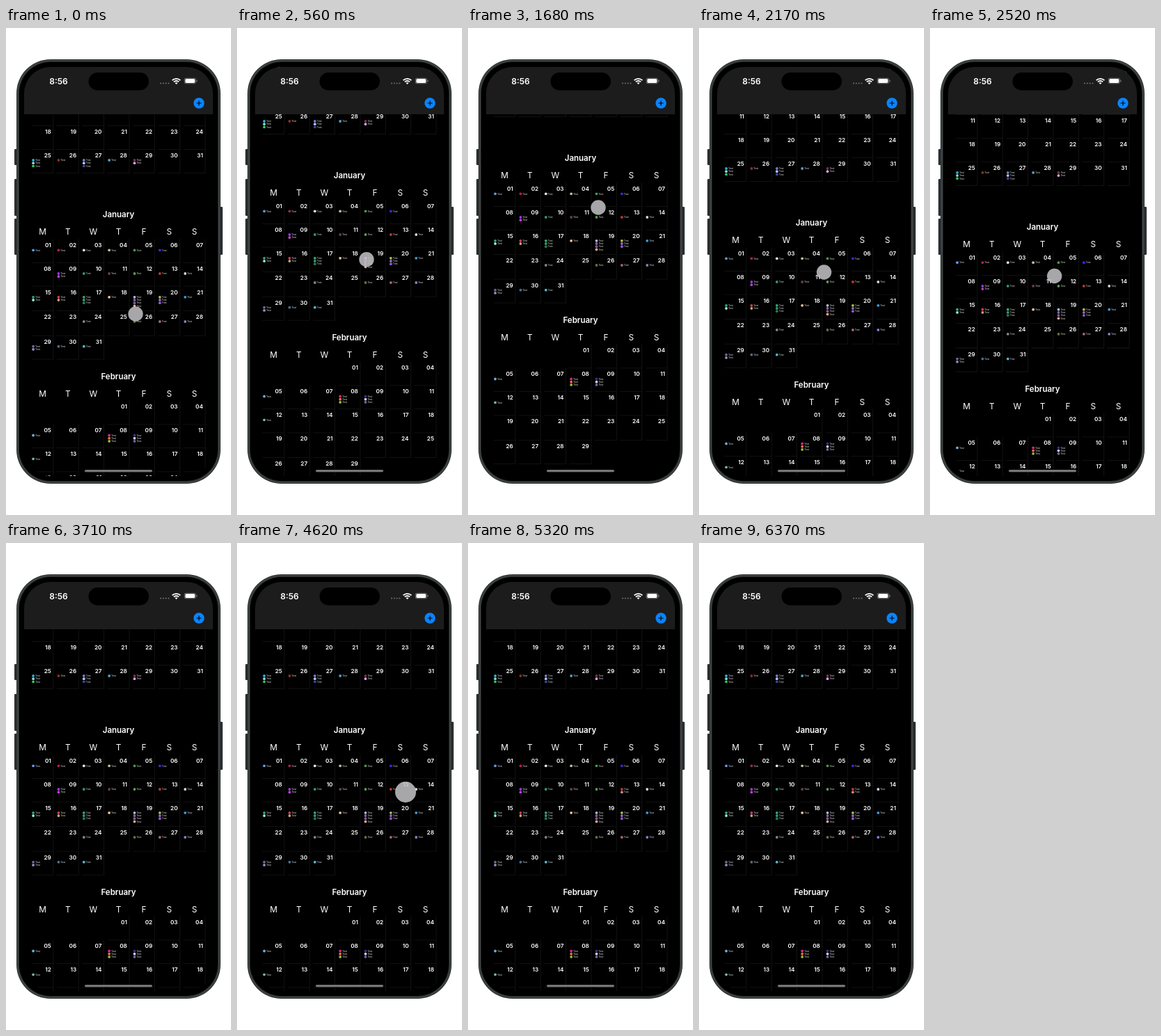
An HTML page with a canvas for the animation above (6970 ms loop, 323x700 px).

```html
<!DOCTYPE html>
<html lang="en">
<head>
<meta charset="utf-8">
<title>Calendar</title>
<style>
  html, body { margin: 0; width: 100%; height: 100%; overflow: hidden; background: #fff; }
  canvas { display: block; width: 323px; height: 700px; }
</style>
</head>
<body>
<canvas id="stage"></canvas>
<script>
const WIDTH = 323, HEIGHT = 700, LOOP = 6970, STEP = 70, LAST = 6370;
const canvas = document.getElementById('stage');
const ctx = canvas.getContext('2d');
const ratio = window.devicePixelRatio || 1;
canvas.width = WIDTH * ratio;
canvas.height = HEIGHT * ratio;

const PITCH = 36.35;
const EVENT_ADDED = 5110;

// y: title offset; rows: offset of each week's numbers from the title
const months = [
  { y: -233, first: 4, days: 31, rows: [10, 46, 80, 114, 148], events: {
    25: '#27b5cc #93d4dc #35c85a', 26: '#8e3023', 27: '#7877d0 #a0d4df #5538a0',
    28: '#559fc9', 29: '#7b304c #d4a5dc' } },
  { name: 'January', y: 0, first: 0, days: 31, rows: [44.3, 78, 111.8, 147, 182.7], events: {
    1: '#5e9ce8', 2: '#b32340', 3: '#e8e8e8', 4: '#b9c4a2', 5: '#489850', 6: '#392be0',
    9: '#963bd8 #c73bd2', 10: '#2f9b6b', 11: '#684150', 12: '#58a052', 13: '#bd3b2c',
    14: '#d7d8ef', 15: '#30ad7b #9ce6d2', 16: '#d73c61 #c2a36c', 17: '#3ba96c #2d9a74 #307a52',
    18: '#efc89a', 19: '#b8b9d8 #786a9c #895ba2 #e5a78f', 20: '#a7c54b #a062be #8960d5',
    21: '#3b9fdc', 24: '#7a8b82', 26: '#5a7941', 27: '#a66970', 28: '#8981c8',
    29: '#6a6b91 #9a8bc0', 30: '#4b708f', 31: '#59b6cd' } },
  { name: 'February', y: 232.5, first: 3, days: 29, rows: [44, 78, 111.8, 145.9, 181.8], events: {
    5: '#6bb0d5', 8: '#d02c80 #ef7142 #91c033', 9: '#3b2b91 #dfcad8 #6b6b9b', 12: '#79b6a0' } }
];

const scrollKeys = [[0, 0], [560, -56], [700, -77], [1000, -83], [1540, -81.5], [1680, -81],
  [2170, 12], [2380, 18], [2870, 17], [3150, 9.5], [3500, 1], [LAST, 1]];
const touches = [
  { start: -STEP, end: 700, x: [[0, 186], [700, 186]], y: [[0, 411], [560, 332.7], [700, 311]], r: [[0, 10.7], [700, 10.7]] },
  { start: 1470, end: 3500, x: [[1470, 187], [1680, 187], [2170, 179.5], [3150, 178], [3500, 178]],
    y: [[1470, 258], [1680, 258], [2170, 351], [2380, 357], [2870, 352], [3150, 334.7], [3500, 326]],
    r: [[0, 10.7], [3500, 10.7]] },
  { start: 4340, end: 5180, x: [[4340, 242], [5180, 242]], y: [[4340, 358], [5180, 358]], r: [[4340, 10.7], [4620, 15]] }
];

const clamp = v => Math.max(0, Math.min(1, v));

// Monotone cubic interpolation through [time, value] points
function track(keys, t) {
  const end = keys.length - 1;
  if (t <= keys[0][0]) return keys[0][1];
  if (t >= keys[end][0]) return keys[end][1];
  const i = keys.findIndex(k => k[0] > t) - 1;
  const slope = j => (keys[j + 1][1] - keys[j][1]) / (keys[j + 1][0] - keys[j][0]);
  const tangent = j => {
    if (j === 0) return slope(0);
    if (j === end) return slope(end - 1);
    const a = slope(j - 1), b = slope(j);
    return a * b > 0 ? 2 * a * b / (a + b) : 0;
  };
  const [t0, v0] = keys[i], [t1, v1] = keys[i + 1];
  const h = t1 - t0, u = (t - t0) / h, w = 1 - u;
  return v0 * (1 + 2 * u) * w * w + v1 * u * u * (3 - 2 * u)
    + h * u * w * (w * tangent(i) - u * tangent(i + 1));
}

function text(str, x, y, size, weight = 600, color = '#fff', align = 'center') {
  ctx.font = `${weight} ${size}px Inter, Arial, sans-serif`;
  ctx.textAlign = align;
  ctx.fillStyle = color;
  ctx.fillText(str, x, y + size * 0.364);
}

function box(x, y, w, h, r, color) {
  ctx.beginPath();
  ctx.roundRect(x, y, w, h, r);
  ctx.fillStyle = color;
  ctx.fill();
}

function disc(x, y, r, color) {
  ctx.beginPath();
  ctx.arc(x, y, r, 0, Math.PI * 2);
  ctx.fillStyle = color;
  ctx.fill();
}

function drawEvent(x, y, color) {
  disc(x, y, 1.9, color);
  text('Test', x + 2.9, y, 3.4, 500, '#c4c4c4', 'left');
}

function drawDay(month, day, top, t) {
  const cell = month.first + day - 1, col = cell % 7;
  const row = Math.floor(cell / 7), y = top + month.rows[row];
  const left = 36.5 + col * PITCH;
  const height = row < 4 ? month.rows[row + 1] - month.rows[row] : 34;
  box(left, y - 9 + height, 32, 0.8, 0, '#171717');
  box(left + 31, y - 9, 0.8, height, 0, '#171717');
  text(String(day).padStart(2, '0'), left + 28.3, y, 8.2, 600, '#fff', 'right');
  const colors = (month.events[day] || '').split(' ').filter(Boolean);
  colors.forEach((color, i) => drawEvent(left + 2.6, y + 7 + i * 4.2, color));
  if (month.name === 'January' && day === 13) {
    ctx.globalAlpha = clamp((t - EVENT_ADDED) / 210);
    drawEvent(left + 2.6, y + 11.2, '#c08d90');
    ctx.globalAlpha = 1;
  }
}

function drawCalendar(t) {
  const scroll = track(scrollKeys, t);
  for (const month of months) {
    const top = 268 + scroll + month.y;
    if (month.name) {
      text(month.name, 161.5, top, 11.5);
      [...'MTWTFSS'].forEach((d, i) => text(d, 52.5 + i * PITCH, top + 25, 11.8, 400));
    }
    for (let day = 1; day <= month.days; day++) drawDay(month, day, top, t);
  }
}

function drawBody() {
  const edge = '#2b2f30';
  for (const [x, y, h] of [[12, 174, 23], [12, 217, 53], [12, 274, 52], [306, 257, 69]])
    box(x, y, 5, h, 1.2, edge);
  const rings = [[0, edge], [1, '#404445'], [3, '#232728'], [4, '#000']];
  for (const [inset, color] of rings)
    box(15 + inset, 45 + inset, 293 - inset * 2, 610 - inset * 2, 49 - inset, color);
}

function drawStatus() {
  box(26, 56, 271, 68, 0, '#1c1c1c');
  box(118.5, 64, 86.5, 25.5, 12.75, '#000');
  text('8:56', 75.5, 76.5, 12);
  for (let i = 0; i < 4; i++) disc(222 + i * 3.8, 79.5, 1.1, '#6b6b6b');

  ctx.save();
  ctx.beginPath();
  ctx.moveTo(244.5, 81);
  ctx.arc(244.5, 81, 10, -Math.PI * 0.75, -Math.PI * 0.25);
  ctx.clip();
  disc(244.5, 81, 2.8, '#fff');
  ctx.strokeStyle = '#fff';
  ctx.lineWidth = 1.8;
  for (const r of [5, 8.2]) {
    ctx.beginPath();
    ctx.arc(244.5, 81, r, 0, Math.PI * 2);
    ctx.stroke();
  }
  ctx.restore();

  box(255.8, 71.7, 17, 8.6, 2.7, '#777');
  box(256.6, 72.5, 15.4, 7, 2, '#1c1c1c');
  box(257.3, 73.1, 14, 5.8, 1.6, '#fff');
  box(273.5, 74.5, 1.1, 3, 0.6, '#777');

  disc(277, 108, 7.7, '#0a84ff');
  box(273.4, 107.4, 7.2, 1.2, 0.5, '#000');
  box(276.4, 104.4, 1.2, 7.2, 0.5, '#000');
}

function drawTouch(t) {
  for (const touch of touches) {
    const alpha = clamp((t - touch.start + 70) / 70) * clamp(1 - (t - touch.end) / 140);
    if (!alpha) continue;
    ctx.globalAlpha = alpha * 0.86;
    disc(track(touch.x, t), track(touch.y, t), track(touch.r, t), '#c3c3c6');
    ctx.globalAlpha = 1;
  }
}

function draw(now) {
  const t = Math.min(LAST, Math.floor((now % LOOP) / STEP) * STEP);
  ctx.setTransform(ratio, 0, 0, ratio, 0, 0);
  ctx.fillStyle = '#fff';
  ctx.fillRect(0, 0, WIDTH, HEIGHT);
  drawBody();
  ctx.save();
  ctx.beginPath();
  ctx.roundRect(26, 56, 271, 588, 38);
  ctx.clip();
  drawCalendar(t);
  drawStatus();
  box(113, 635, 97, 3.2, 1.6, '#777');
  drawTouch(t);
  ctx.restore();
}

const begin = performance.now();
function tick() {
  draw(performance.now() - begin);
  requestAnimationFrame(tick);
}
tick();
</script>
</body>
</html>
```
